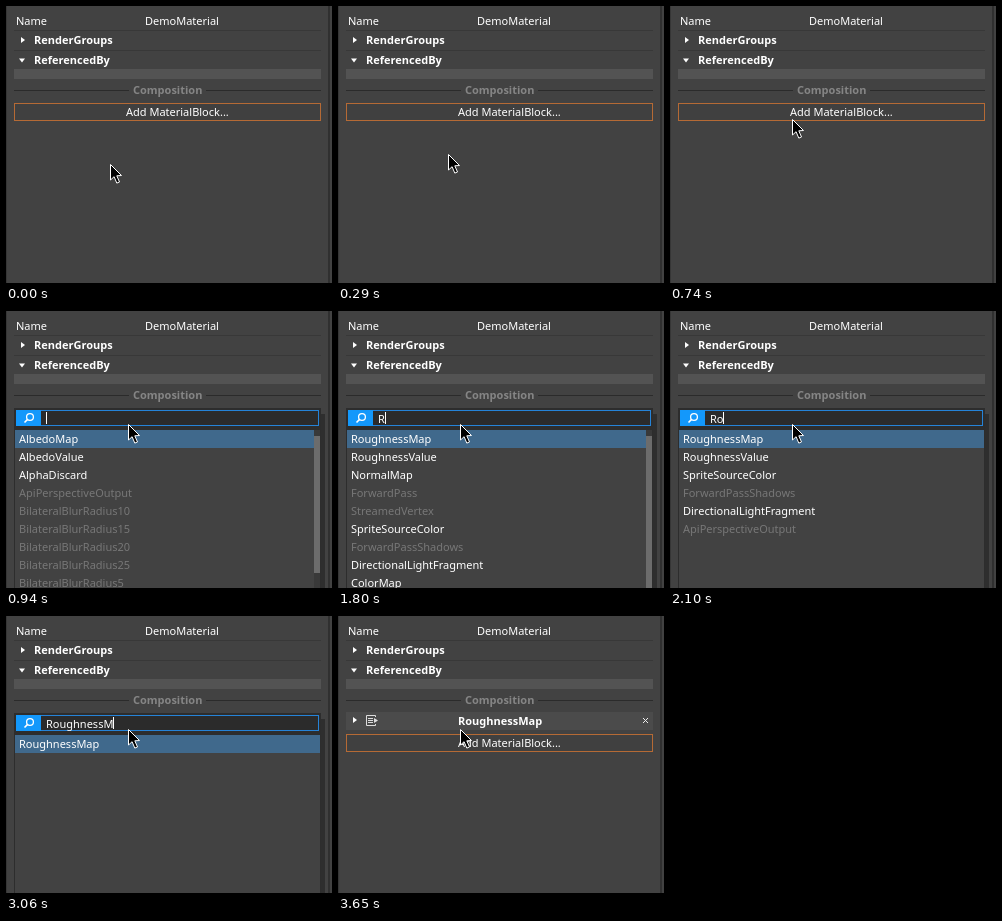
Recreate the animation shown at these times as an HTML page with a canvas. Size 326 by 277 pixels, loop 4.81 s.

```html
<!DOCTYPE html>
<html lang="en">
<head>
<meta charset="utf-8">
<title>Material editor</title>
<style>
  html, body { margin: 0; height: 100%; overflow: hidden; background: #424242; }
  canvas { display: block; }
</style>
</head>
<body>
<canvas id="stage" width="326" height="277"></canvas>
<script>
const ctx = document.getElementById('stage').getContext('2d');
const LOOP = 4810, OPEN = 940, DONE = 3650;
const WORD = 'RoughnessM';
const KEY_TIMES = [1800, 2000, 2120, 2240, 2370, 2490, 2590, 2660, 2830, 3060];

// A leading "-" marks an unavailable block.
const ALL = ['AlbedoMap', 'AlbedoValue', 'AlphaDiscard', '-ApiPerspectiveOutput',
  '-BilateralBlurRadius10', '-BilateralBlurRadius15', '-BilateralBlurRadius20',
  '-BilateralBlurRadius25', '-BilateralBlurRadius5'];
const RANKED = ['RoughnessMap', 'RoughnessValue', 'NormalMap', '-ForwardPass',
  '-StreamedVertex', 'SpriteSourceColor', '-ForwardPassShadows',
  'DirectionalLightFragment', 'ColorMap', '-ApiPerspectiveOutput'];

function rect(x, y, w, h, color) {
  ctx.fillStyle = color;
  ctx.fillRect(x, y, w, h);
}

function frame(x, y, w, h, color) {
  ctx.strokeStyle = color;
  ctx.lineWidth = 1;
  ctx.strokeRect(x + .5, y + .5, w - 1, h - 1);
}

function text(str, x, y, color = '#fff', bold = false) {
  ctx.font = (bold ? 'bold ' : '') + '11px "Noto Sans", "Open Sans", sans-serif';
  ctx.fillStyle = color;
  ctx.fillText(str, x, y);
}

function shape(points, fill, stroke) {
  ctx.beginPath();
  points.forEach(([x, y]) => ctx.lineTo(x, y));
  ctx.closePath();
  if (fill) { ctx.fillStyle = fill; ctx.fill(); }
  if (stroke) { ctx.strokeStyle = stroke; ctx.lineWidth = 1; ctx.stroke(); }
}

function line(points, color, width = 1) {
  ctx.beginPath();
  points.forEach(([x, y]) => ctx.lineTo(x, y));
  ctx.strokeStyle = color;
  ctx.lineWidth = width;
  ctx.stroke();
}

const arrowRight = (x, y) => shape([[x, y - 3], [x + 4, y], [x, y + 3]], '#fff');
const arrowDown = (x, y) => shape([[x - 3, y - 2], [x + 3, y - 2], [x, y + 2]], '#fff');

function panel() {
  rect(0, 0, 326, 277, '#424242');
  rect(0, 0, 1, 277, '#363636');
  rect(322, 0, 2, 277, '#303030');
  text('Name', 10, 19);
  text('DemoMaterial', 139, 19);
  rect(8, 24, 307, 1, '#383838');
  arrowRight(15, 34);
  text('RenderGroups', 28, 38, '#fff', true);
  rect(8, 44, 307, 1, '#383838');
  arrowDown(16, 54.5);
  text('ReferencedBy', 28, 58, '#fff', true);
  rect(8, 63, 307, 10, '#535353');
  rect(8, 84, 115, 1, '#2b2b2b');
  rect(200, 84, 115, 1, '#2b2b2b');
  text('Composition', 127, 88, '#858585', true);
}

function addButton(y) {
  rect(8, y, 307, 18, '#404040');
  frame(8, y, 307, 18, '#b56a35');
  text('Add MaterialBlock...', 120, y + 13);
}

function addedBlock() {
  rect(8, 96, 307, 18, '#4b4b4b');
  arrowRight(15, 104);
  line([[37.5, 101], [37.5, 99.5], [28.5, 99.5], [28.5, 109.5], [37.5, 109.5], [37.5, 108]], '#ddd');
  for (const y of [102.5, 104.5, 106.5]) line([[30, y], [35, y]], '#ddd');
  shape([[36, 102], [40, 104.5], [36, 107]], '#ddd');
  text('RoughnessMap', 120, 109, '#fff', true);
  line([[305, 102], [310, 107]], '#eee');
  line([[310, 102], [305, 107]], '#eee');
}

function matches(query) {
  if (!query) return ALL;
  const pattern = new RegExp([...query].join('.*'), 'i');
  return RANKED.filter(name => pattern.test(name));
}

function searchPopup(query) {
  const items = matches(query);
  const scrolls = items.length > 8;
  rect(314, 103, 5, 174, 'rgba(0,0,0,.3)');
  rect(8, 97, 307, 180, '#2d2d2d');
  rect(9, 119, 305, 158, '#424242');

  rect(35, 99, 278, 16, '#2b2b2b');
  frame(10, 99, 303, 16, '#2583d8');
  rect(10, 99, 25, 16, '#1398fb');
  ctx.beginPath();
  ctx.arc(24, 106, 3.4, 0, 2 * Math.PI);
  ctx.strokeStyle = '#fff';
  ctx.lineWidth = 1.3;
  ctx.stroke();
  line([[21.6, 108.4], [18.5, 111.5]], '#fff', 1.6);

  text(query, 40, 112);
  rect(40 + Math.round(ctx.measureText(query).width), 101, 1, 12, '#fff');

  rect(9, 119, scrolls ? 299 : 305, 18, '#40698c');
  items.slice(0, 9).forEach((item, i) => {
    const dim = item[0] === '-';
    text(dim ? item.slice(1) : item, 13, 132 + 18 * i, dim ? '#777' : '#fff');
  });
  if (scrolls) {
    rect(308, 119, 6, 158, '#393939');
    rect(308, 125, 6, query ? 152 : 137, '#6c6c6c');
  }
}

// The pointer follows a quadratic curve in 18 steps of 30 ms.
function pointer(time) {
  const step = Math.floor((time - 230) / 30) + 1;
  const t = Math.max(0, Math.min(18, step)) / 18;
  const curve = (a, b, c) => Math.round((1 - t) ** 2 * a + 2 * t * (1 - t) * b + t * t * c);
  ctx.save();
  ctx.translate(curve(104, 123, 122) + .5, curve(158, 128, 113) + .5);
  shape([[0, 0], [0, 15.5], [3.6, 12.2], [6.3, 18.6], [9, 17.5], [6.3, 11.3], [11, 11]], '#000', '#fff');
  ctx.restore();
}

function draw(now) {
  const time = now % LOOP;
  panel();
  if (time < OPEN) {
    addButton(97);
  } else if (time < DONE) {
    searchPopup(WORD.slice(0, KEY_TIMES.filter(key => key <= time).length));
  } else {
    addedBlock();
    addButton(118);
  }
  pointer(time);
}

const start = performance.now();
function tick() {
  draw(performance.now() - start);
  requestAnimationFrame(tick);
}
tick();
</script>
</body>
</html>
```
